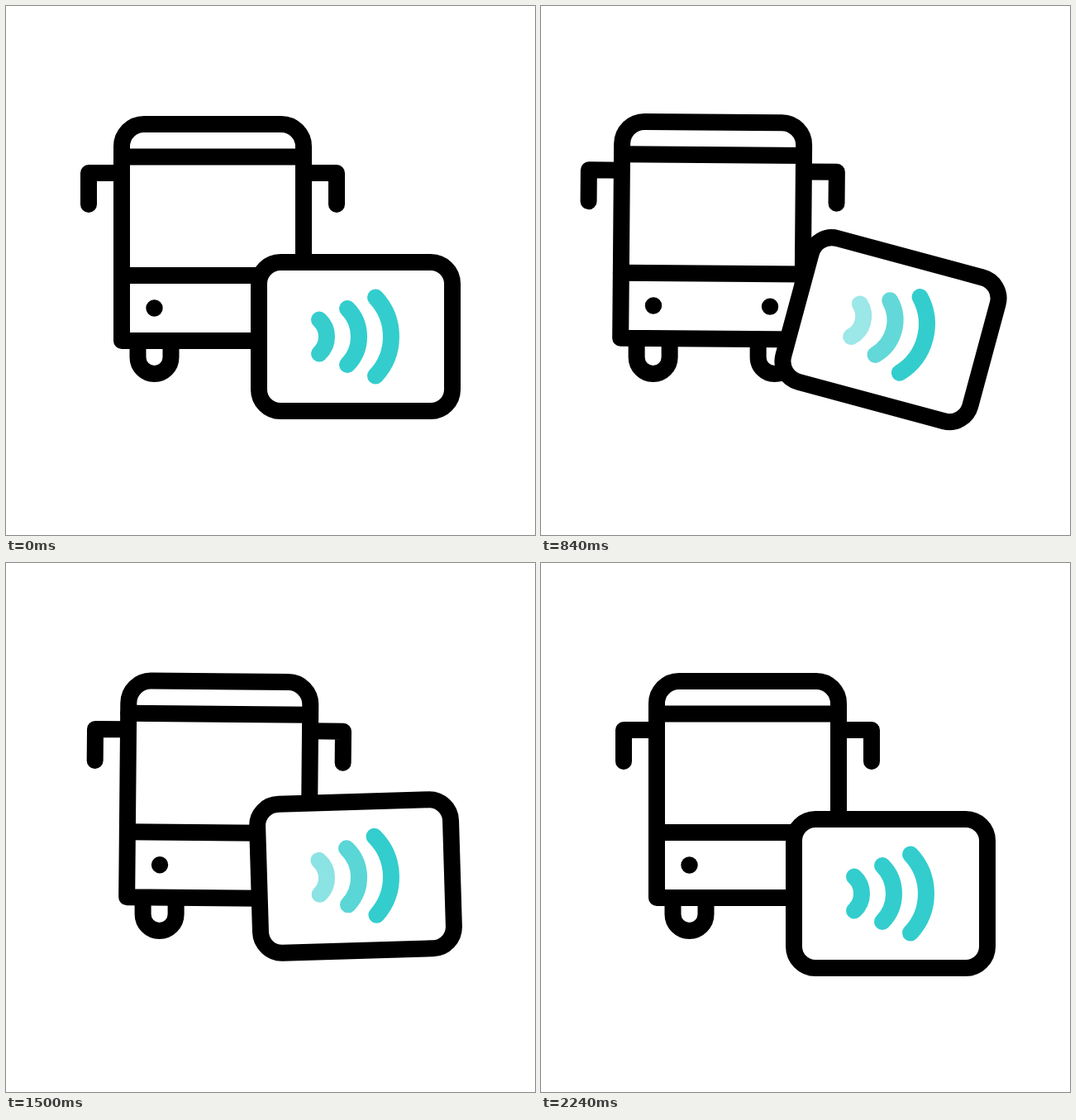
An HTML page for the animation above (2.4 s loop, 640 by 640 pixels).

```html
<!DOCTYPE html>
<html lang="en">
<head>
<meta charset="utf-8">
<title>Contactless bus ticket</title>
<style>
  html, body { margin: 0; width: 100%; height: 100%; overflow: hidden; background: #fff; }
  svg { display: block; width: 100%; height: 100%; }
  .line { fill: none; stroke: #000; stroke-width: 20; stroke-linecap: round; stroke-linejoin: round; }
  .solid { fill: #fff; }
  .wave { fill: none; stroke: #33cdcd; stroke-width: 20; stroke-linecap: round; }
</style>
</head>
<body>
<svg viewBox="0 0 640 640">
  <g id="wheels" class="line solid">
    <path d="M159.5 388V425a20 20 0 0 0 40 0V388"/>
    <path d="M306.5 388V425a20 20 0 0 0 40 0V388"/>
  </g>
  <g id="bus" class="line">
    <path d="M140 202H100V240M360 202H400V240"/>
    <path class="solid" d="M140 405V170a27 27 0 0 1 27-27H333a27 27 0 0 1 27 27V405Z"/>
    <path d="M140 182.5H360M140 326H360"/>
    <g fill="#000" stroke="none">
      <circle cx="179.5" cy="365.5" r="10.2"/>
      <circle cx="320.5" cy="365.5" r="10.2"/>
    </g>
  </g>
  <g id="card">
    <rect class="line solid" x="306" y="310" width="234" height="180" rx="26"/>
    <path class="wave" d="M379 379.5a27.8 27.8 0 0 1 0 41"/>
    <path class="wave" d="M413 366a48.3 48.3 0 0 1 0 68"/>
    <path class="wave" d="M447 352.5a69 69 0 0 1 0 95"/>
  </g>
</svg>
<script>
const LOOP = 2400, REST = 2140, FADE = 310;

const ease = u => (1 - Math.cos(Math.PI * u)) / 2;
const clamp = (v, lo, hi) => Math.min(hi, Math.max(lo, v));

// Evenly spaced moments from 0 to end, one per stop.
const even = (stops, end) => stops.map((_, i) => i * end / (stops.length - 1));

// Eased swing from stop to stop, then rest at the last one.
function swing(stops, times = even(stops, REST)) {
  return t => {
    const i = times.findIndex(time => time > t);
    if (i < 0) return stops[stops.length - 1];
    const u = (t - times[i - 1]) / (times[i] - times[i - 1]);
    return stops[i - 1] + (stops[i] - stops[i - 1]) * ease(u);
  };
}

const drive = [0, -67.5, 10.5, 0];
const bounce = [0, 350, 705, 1005, 1300, 1695, REST];
const busX = swing(drive, even(drive, 1840));
const busY = swing([0, 18.1, -15.7, 15.4, -6.5, 6.8, 0], bounce);
const busTurn = swing([0, -1.67, 2.08, -1.68, 2.55, -1.4, 0], bounce);
const cardY = swing([0, 53.4, -33, 53.8, -25, 14, 0]);
const cardTurn = swing([0, -17.7, 15.2, -7.4, 3.7, 0]);

// Each wave fades out and back three times, the outer ones later.
function glow(i, t) {
  const first = 305 + 100 * i, beat = 685 - 12 * i;
  const n = clamp(Math.round((t - first) / beat), 0, 2);
  return Math.min(1, Math.abs(t - first - n * beat) / FADE);
}

const [wheels, bus, card] = ["wheels", "bus", "card"].map(id => document.getElementById(id));
const waves = document.querySelectorAll(".wave");
const place = (node, x, y, turn = 0, cx = 0, cy = 0) =>
  node.setAttribute("transform", `translate(${x} ${y}) rotate(${turn} ${cx} ${cy})`);

function draw(t) {
  const x = busX(t);
  place(wheels, x, 0);
  place(bus, x, busY(t), busTurn(t), 250, 410);
  place(card, 0, cardY(t), cardTurn(t), 423, 400);
  waves.forEach((wave, i) => wave.setAttribute("stroke-opacity", glow(i, t)));
}

const start = performance.now();
function tick() {
  draw(Math.max(0, performance.now() - start) % LOOP);
  requestAnimationFrame(tick);
}
tick();
</script>
</body>
</html>
```
